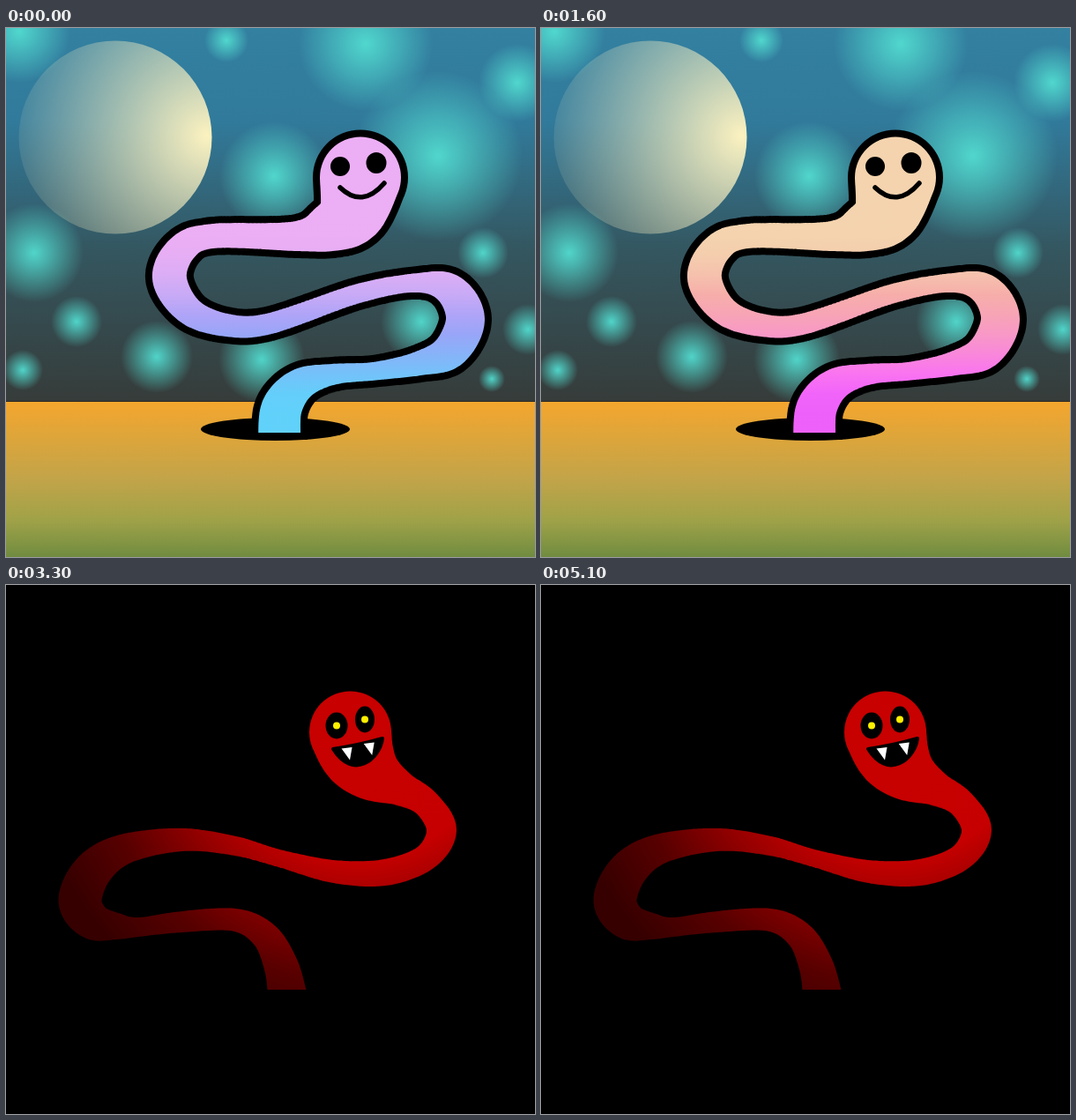
These frames come from a looping animation (600x600 px, 5200 ms). An HTML page with a canvas:

```html
<!DOCTYPE html>
<html lang="en">
<head>
<meta charset="utf-8">
<title>Worm</title>
<style>
  html, body { margin: 0; width: 100%; height: 100%; overflow: hidden; background: #000; }
  canvas { display: block; width: 600px; height: 600px; }
</style>
</head>
<body>
<canvas id="stage" width="600" height="600"></canvas>
<script>
const ctx = document.getElementById('stage').getContext('2d');
const LOOP = 5200, STEP = 100, NIGHT = 2600;
const FLASH = [2800, 3000];
const OUTLINE = 8;

// spine: x, y, radius from the hole up to the head; fade: heights between which the tint shifts.
const poses = [
  {
    spine: [[310, 464, 24], [313, 430, 23], [334, 404, 18], [370, 393, 12], [420, 389, 10.5],
      [470, 380, 14], [504, 366, 20], [521, 330, 22], [504, 297, 18], [467, 289, 11], [400, 301, 11],
      [300, 335, 12], [250, 337, 13], [208, 321, 16], [185.5, 284, 19.5], [200, 250, 17],
      [235, 236, 14], [330, 236, 17], [370, 225, 28], [393, 208, 37], [402, 169.5, 46]],
    fade: [230, 430],
    eyes: [[379, 157, 11, 11], [420, 153, 11.5, 12]],
    mouth: { x0: 379, y0: 181, x1: 429, y1: 176, depth: 22 },
    smiles: true
  },
  {
    spine: [[319, 464, 22], [312, 432, 19.5], [294, 398, 16], [260, 380, 13], [200, 382, 12],
      [150, 388, 11], [125, 387, 15], [98, 381, 21], [84, 357, 24.5], [100, 322, 22], [136, 299, 17],
      [200, 289, 13], [260, 296, 11], [310, 310, 10], [372, 325, 13], [430, 326, 15], [476, 309, 15],
      [494, 278, 17], [476, 247, 16], [446, 230, 20], [417, 214, 31], [399, 193, 41], [390.5, 167, 46.5]],
    fade: [150, 420],
    eyes: [[375, 159.5, 12.5, 15], [407, 152.5, 11, 15]],
    mouth: { x0: 371, y0: 186, x1: 427, y1: 174, depth: 30 }
  }
];

// x, y, radius
const orbs = [
  [15, 4, 58], [250, 14, 25], [408, 18, 76], [580, 62, 44], [490, 145, 96],
  [304, 168, 62], [32, 255, 56], [541, 255, 29], [80, 333, 29], [171, 373, 41],
  [290, 376, 49], [19, 388, 23], [551, 398, 15], [592, 342, 29], [471, 333, 46]
];

const bolt = [[470, 0], [517, 0], [471, 38], [568, 33], [420, 167], [397, 247], [233, 411],
  [386, 231], [308, 240], [486, 70], [389, 83]];

// Hue of the head through the day: time, degrees.
const hueKeys = [[0, 293], [500, 246], [1600, 32], [2300, -45], [2600, -67]];

const mix = (a, b, u) => a + (b - a) * u;

function smoothstep(from, to, v) {
  const u = Math.min(1, Math.max(0, (v - from) / (to - from)));
  return u * u * (3 - 2 * u);
}

function gradient(g, ...stops) {
  stops.forEach(([at, color]) => g.addColorStop(at, color));
  return g;
}
const vertical = (y0, y1, ...stops) => gradient(ctx.createLinearGradient(0, y0, 0, y1), ...stops);
const radial = (x, y, r, ...stops) => gradient(ctx.createRadialGradient(x, y, 0, x, y, r), ...stops);

function ellipse(x, y, rx, ry, color) {
  ctx.fillStyle = color;
  ctx.beginPath();
  ctx.ellipse(x, y, rx, ry, 0, 0, 7);
  ctx.fill();
}

function polygon(pts, color) {
  ctx.fillStyle = color;
  ctx.beginPath();
  pts.forEach(p => ctx.lineTo(...p));
  ctx.fill();
}

// Discs strung along a Catmull-Rom curve through the spine, cut off at the floor.
function bodyPath(spine, grow) {
  const path = new Path2D(), parts = 24;
  const at = i => spine[Math.max(0, Math.min(spine.length - 1, i))];
  for (let i = 0; i < spine.length - 1; i++) {
    const [a, b, c, d] = [-1, 0, 1, 2].map(k => at(i + k));
    for (let s = 0; s <= parts; s++) {
      const u = s / parts;
      const [x, y, r] = b.map((v, k) => v + u / 2 * (c[k] - a[k] +
        u * (2 * a[k] - 5 * v + 4 * c[k] - d[k] + u * (3 * (v - c[k]) + d[k] - a[k]))));
      path.moveTo(x + r + grow, y);
      path.arc(x, y, r + grow, 0, 2 * Math.PI);
    }
  }
  return path;
}
for (const pose of poses) {
  pose.shell = bodyPath(pose.spine, OUTLINE);
  pose.skin = bodyPath(pose.spine, 0);
}

function fillAbove(floor, path, color) {
  ctx.save();
  ctx.beginPath();
  ctx.rect(0, 0, 600, floor);
  ctx.clip();
  ctx.fillStyle = color;
  ctx.fill(path);
  ctx.restore();
}

function dayTint(t, [from, to]) {
  const k = hueKeys.findIndex(key => key[0] > t);
  const [t0, h0] = hueKeys[k - 1], [t1, h1] = hueKeys[k];
  const hue = mix(h0, h1, (t - t0) / (t1 - t0));
  const tint = ctx.createLinearGradient(0, 100, 0, 460);
  for (let u = 0; u <= 1; u += 1 / 16) {
    const f = smoothstep(from, to, mix(100, 460, u));
    tint.addColorStop(u, `hsl(${hue - 97 * f} ${76 + 18 * f}% ${82 - 14 * f ** 3}%)`);
  }
  return tint;
}

const nightTint = radial(400, 150, 380,
  [0, '#c80000'], [.42, '#c60000'], [.64, '#840000'], [.79, '#580000'], [1, '#360000']);
const sky = vertical(0, 423, [0, '#3380a0'], [.25, '#317a9b'], [.6, '#34565f'], [1, '#363c3a']);
const ground = vertical(424, 600, [0, '#f4a62e'], [.5, '#c2a449'], [.76, '#a0a248'], [1, '#708c40']);
const moon = radial(228, 122, 225, [0, 'rgba(252,242,192,1)'], [1, 'rgba(244,236,192,.06)']);

function drawDay() {
  ctx.fillStyle = sky;
  ctx.fillRect(0, 0, 600, 424);
  for (const [x, y, r] of orbs) {
    ellipse(x, y, r, r, radial(x, y, r, [0, 'rgba(82,220,208,.95)'], [1, 'rgba(82,220,208,0)']));
  }
  ellipse(124, 124, 109.5, 109.5, moon);
  ctx.fillStyle = ground;
  ctx.fillRect(0, 424, 600, 176);
  ctx.fillStyle = '#2c2824';
  ctx.fillRect(0, 423, 600, 1);
}

function drawNight(flash) {
  ctx.fillStyle = '#000';
  ctx.fillRect(0, 0, 600, 600);
  if (flash) polygon(bolt, '#fff800');
}

function drawMouth({ x0, y0, x1, y1, depth }, smiling) {
  ctx.lineJoin = ctx.lineCap = 'round';
  ctx.strokeStyle = ctx.fillStyle = '#000';
  ctx.lineWidth = smiling ? 5.5 : 4;
  ctx.beginPath();
  ctx.moveTo(x0, y0);
  if (smiling) {
    ctx.quadraticCurveTo(mix(x0, x1, .5), y0 + depth + 2, x1, y1);
  } else {
    ctx.quadraticCurveTo(mix(x0, x1, .5), mix(y0, y1, .5) + 2, x1, y1);
    ctx.bezierCurveTo(x1 - 3, y1 + depth * .8, mix(x0, x1, .4), y0 + depth * 1.2, x0, y0);
    ctx.fill();
  }
  ctx.stroke();
}

function drawFangs({ x0, y0, x1, y1 }) {
  for (const u of [.17, .62]) {
    const x = mix(x0, x1, u), y = mix(y0, y1, u) + 1.5;
    polygon([[x, y], [x + 12, y - 1.5], [x + 9.5, y + 13]], '#fff');
  }
}

function draw(t) {
  const night = t >= NIGHT;
  const pose = poses[t / STEP % 2];
  if (night) drawNight(t >= FLASH[0] && t < FLASH[1]);
  else drawDay();

  ellipse(305.5, 455, 84.5, 13, '#000');
  fillAbove(467, pose.shell, '#000');
  fillAbove(459, pose.skin, night ? nightTint : dayTint(t, pose.fade));

  for (const [x, y, rx, ry] of pose.eyes) {
    ellipse(x, y, rx, ry, '#000');
    if (night) ellipse(x, y, 4, 4, '#fff000');
  }
  drawMouth(pose.mouth, pose.smiles && !night);
  if (night) drawFangs(pose.mouth);
}

const start = performance.now();
function tick() {
  const t = (performance.now() - start) % LOOP;
  draw(Math.floor(t / STEP) * STEP);
  requestAnimationFrame(tick);
}
tick();
</script>
</body>
</html>
```
